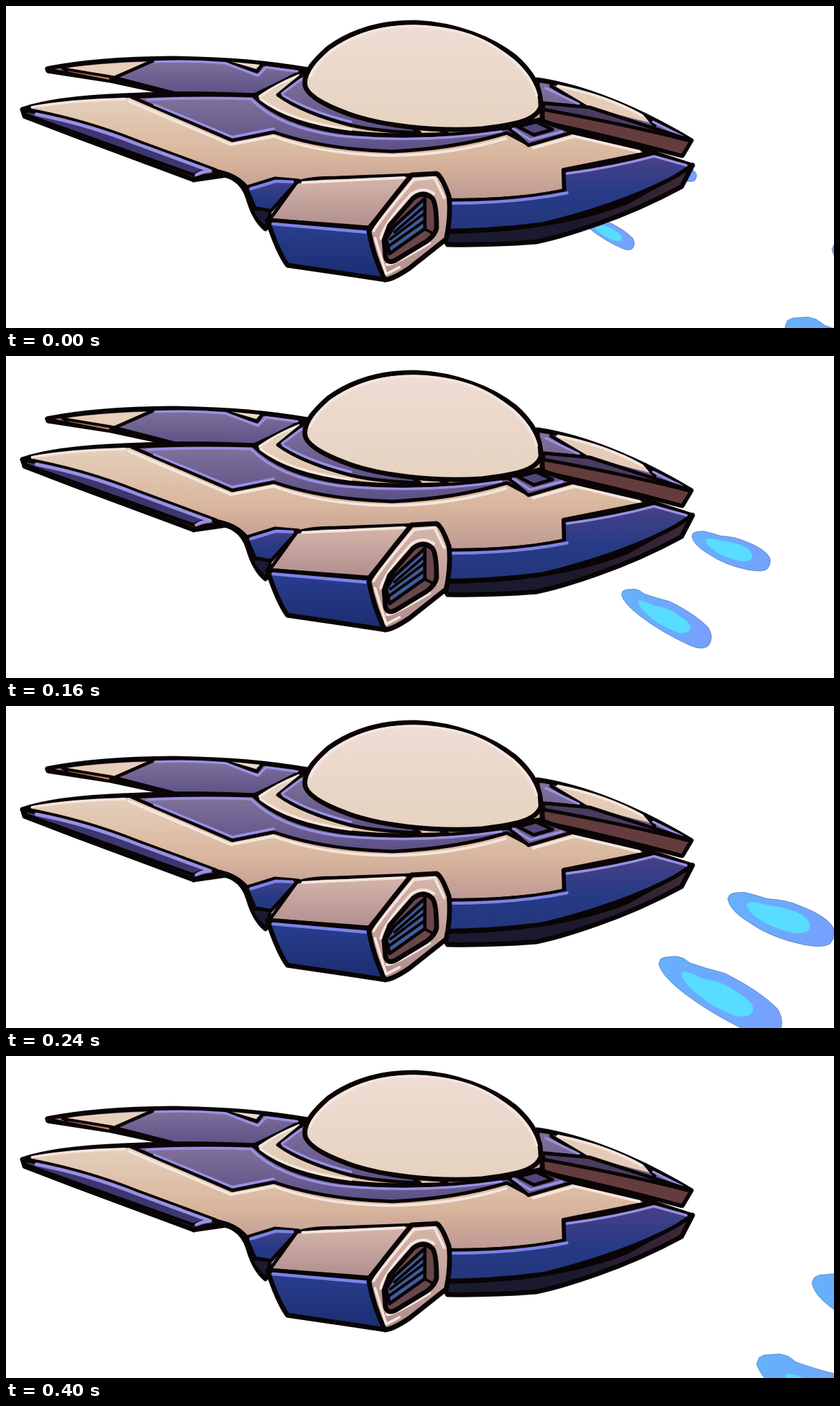
Recreate the animation shown at these times as an HTML page. Size 1200 by 467 pixels, loop 480 ms.

```html
<!DOCTYPE html>
<html lang="en">
<head>
<meta charset="utf-8">
<title>Spaceship</title>
<style>
  html, body { margin: 0; width: 100%; height: 100%; overflow: hidden; background: #fff; }
  svg { display: block; width: 100%; height: 100%; }
  .ship path { stroke: #090405; stroke-width: 7; stroke-linejoin: round; stroke-linecap: round; }
  .ship .edge { fill: none; }
  .ship .thin { stroke-width: 5; }
  .ship .lavender { fill: none; stroke: #9990e4; stroke-width: 3.5; }
  .ship .blue { fill: none; stroke: #7d83e6; stroke-width: 4.5; }
  .ship .light { fill: none; stroke: #f5e5de; stroke-width: 4; }
  .ship .plain { stroke: none; }
  .glow { stroke: #496fae; stroke-width: .7; vector-effect: non-scaling-stroke; }
</style>
</head>
<body>
<svg viewBox="0 0 1200 467">
  <defs>
    <linearGradient id="cream" gradientUnits="userSpaceOnUse" x1="0" y1="130" x2="0" y2="290">
      <stop stop-color="#e5d1bd"/><stop offset=".55" stop-color="#d9b69d"/><stop offset="1" stop-color="#b99492"/>
    </linearGradient>
    <linearGradient id="purple" x2="0" y2="1">
      <stop stop-color="#82739a"/><stop offset="1" stop-color="#5b5087"/>
    </linearGradient>
    <linearGradient id="navy" x2="0" y2="1">
      <stop stop-color="#4a4286"/><stop offset=".55" stop-color="#273a86"/><stop offset="1" stop-color="#22367c"/>
    </linearGradient>
    <linearGradient id="podSide" x2="0" y2="1">
      <stop stop-color="#293f91"/><stop offset="1" stop-color="#1b2c70"/>
    </linearGradient>
    <linearGradient id="podTop" x2="0" y2="1">
      <stop stop-color="#d6b7ab"/><stop offset="1" stop-color="#b08d8d"/>
    </linearGradient>
    <linearGradient id="dome" x2="0" y2="1">
      <stop stop-color="#efddd4"/><stop offset="1" stop-color="#e6d2c0"/>
    </linearGradient>
    <linearGradient id="keel">
      <stop stop-color="#191b31"/><stop offset=".55" stop-color="#1c192d"/><stop offset="1" stop-color="#3f2a3a"/>
    </linearGradient>
    <linearGradient id="plasma">
      <stop stop-color="#65b1fd"/><stop offset="1" stop-color="#77a0ff"/>
    </linearGradient>
    <g id="lowBolt">
      <path class="glow" fill="url(#plasma)" d="M0 8L2 3L6 1L19 0L26 2L33 7Q50 13 70 18Q108 37 126 56Q134 70 127 81Q119 90 100 82Q60 64 28 40Q3 21 0 8Z"/>
      <path fill="#58dcff" d="M24 18Q26 13 47 24Q67 26 83 38Q101 49 100 57Q97 66 81 63Q53 53 34 34Q25 25 24 18Z"/>
    </g>
    <g id="highBolt">
      <path class="glow" fill="url(#plasma)" d="M0 7L2 3L6 1L17 0L29 3L42 7Q63 8 78 15Q107 26 113 39Q115 48 109 55Q102 60 81 56Q47 49 24 33Q2 20 0 7Z"/>
      <path fill="#58dcff" d="M20 13Q22 8 43 14Q64 16 79 24Q90 32 87 39Q83 46 68 43Q43 37 28 25Q20 18 20 13Z"/>
    </g>
  </defs>

  <g id="bolts"></g>

  <g class="ship">
    <!-- far right wing -->
    <path fill="url(#purple)" d="M770 107Q870 122 993 195L980 217L770 162Z"/>
    <path class="plain" fill="#e4ccb9" d="M788 115Q860 124 930 162L936 170L842 146Z"/>
    <path class="thin edge" d="M790 116L842 147M782 141L842 147M927 158L940 174"/>
    <path class="lavender" d="M782 119L830 142M938 168L980 189"/>
    <path class="light" d="M800 116Q870 130 922 159"/>
    <path fill="#4a3b5f" class="thin" d="M779 141L846 147L993 195L985 199L779 151Z"/>
    <path fill="#643c3d" class="thin" d="M778 150Q900 172 993 196L980 217Q880 190 778 168Z"/>

    <!-- far left wing -->
    <path fill="url(#purple)" d="M60 91Q130 77 240 76Q350 77 436 92L362 130L245 128L152 108L61 94Z"/>
    <path class="plain" fill="#e8cfba" d="M88 90Q135 83 206 81L157 103Z"/>
    <path class="plain" fill="#bd7a5e" d="M70 91L90 90L156 102L150 107Z"/>
    <path class="edge" stroke-width="4" style="stroke-width:4" d="M82 91L155 103M84 90L88 96M152 103L151 109"/>
    <path class="thin edge" d="M214 79L157 104L246 127M318 80L364 95L373 83"/>
    <path class="plain" fill="#eddaca" d="M327 81L368 85L362 91Z"/>
    <path class="lavender" d="M216 81Q270 79 318 83L365 101L377 89L422 95"/>

    <!-- hull -->
    <path fill="url(#cream)" d="M24 150Q70 134 170 130Q270 125 360 130L434 95L776 150L778 167L826 184L940 212L810 238L810 268Q740 284 640 282L500 300L348 263Q333 245 304 240Z"/>
    <path class="light" d="M38 147Q90 137 172 135M178 138L326 201L388 189Q460 216 560 217Q650 215 724 192"/>
    <path class="light" d="M764 206L824 189L918 211"/>

    <!-- left wing underside -->
    <path fill="#54302e" d="M24 150Q110 165 190 197L304 239L314 246L272 252L100 188L27 160Z"/>
    <path fill="#3d366e" class="thin" d="M26 151Q110 165 190 196L304 238Q285 238 272 245L146 200L29 158Z"/>
    <path class="lavender" style="stroke-width:5" d="M44 157Q120 172 190 200L296 239Q283 240 276 245"/>
    <path class="edge" d="M272 252Q298 243 320 246Q343 253 351 279Q360 310 376 323"/>

    <!-- upper panels and rings -->
    <path fill="url(#purple)" class="thin" d="M182 132Q270 127 358 130Q400 172 490 184Q600 196 728 177L756 200L726 184Q650 207 560 211Q460 208 388 183L328 195Z"/>
    <path class="lavender" d="M205 136Q280 132 355 135Q395 176 480 188Q600 200 718 182M215 143L328 190L388 178"/>
    <path fill="url(#cream)" class="thin" d="M361 132Q410 172 500 183Q560 190 640 185L500 120L432 94Z"/>
    <path class="light" d="M368 131Q392 114 424 101M369 135Q412 168 500 179"/>
    <path fill="url(#purple)" class="thin" d="M394 129Q430 155 500 173Q540 182 600 184L500 120L432 98Z"/>
    <path class="lavender" d="M400 127L428 106M402 130Q440 153 500 168"/>
    <path fill="#6a5c8c" class="thin" d="M728 176L772 166L822 183L757 202Z"/>
    <path class="lavender" d="M735 178L760 194L806 182"/>
    <path class="thin" fill="#51467a" d="M742 175L765 187L792 179L768 168Z"/>
    <path fill="#c9a28d" class="thin" d="M748 169L776 148L776 164Z"/>

    <!-- dome -->
    <path fill="url(#dome)" d="M433 112C433 94 448 78 467 61C506 33 550 23 595 24C653 27 704 47 738 74C765 98 776 121 775 146C768 168 730 173 690 178C620 183 540 173 495 156C457 142 433 127 433 112Z"/>
    <path class="light" d="M441 102C452 76 486 50 530 37C590 21 665 31 710 61C744 83 763 105 769 130"/>

    <!-- blue side and keel -->
    <path fill="url(#keel)" d="M630 327Q790 327 900 284L995 231L979 262Q920 294 857 316Q800 336 768 342Q710 347 640 346Z"/>
    <path fill="url(#navy)" style="stroke-width:6" d="M630 282Q740 283 809 268L808 238Q870 232 940 213L995 231L972 246Q900 286 780 316Q710 326 630 326Z"/>
    <path class="blue" d="M646 286Q740 286 813 271"/>
    <path class="lavender" d="M813 243Q880 234 939 218L986 231"/>
    <path fill="#1c1a33" class="thin" d="M356 295L384 292L378 322Q362 312 356 295Z"/>
    <path fill="url(#navy)" class="thin" d="M348 263L390 250L424 253L384 297L361 293Z"/>
    <path class="blue" d="M355 265L391 254L415 255"/>

    <!-- engine pod -->
    <path fill="url(#podTop)" class="thin" d="M382 310L421 256Q440 249 480 249L588 245L525 322Z"/>
    <path class="light" d="M430 256L577 249"/>
    <path fill="url(#podSide)" d="M379 311L526 322L550 397L408 376Q394 357 379 311Z"/>
    <path class="blue" d="M387 316L522 328"/>
    <path fill="url(#podTop)" d="M588 245L624 243Q632 247 642 276Q645 305 638 338L585 380Q560 397 549 397Q533 364 526 327Q530 316 588 245Z"/>
    <path class="light" d="M533 326Q536 318 591 252L621 249L635 278M535 337L551 389L570 379"/>
    <path class="light" d="M543 337Q546 318 587 273Q604 261 620 272M552 375Q558 378 614 344"/>
    <path fill="#68474a" d="M548 340L556 318L590 279Q605 267 618 279Q624 287 624 322Q622 332 610 341L564 369Q553 374 550 364Z"/>
    <path fill="#3f5b99" class="thin" d="M551 338L562 320L607 279L607 323L556 359Z"/>
    <path class="edge" style="stroke-width:4" d="M563 328L606 291M557 338L606 301M555 348L606 312M608 324L619 330"/>
  </g>
</svg>
<script>
  const STEP = 80;
  const STEPS = 6;
  // x, y and scale of a bolt for each step of its flight
  const flights = {
    lowBolt: [[835, 304, .58], [858, 320, .71], [892, 338, 1], [946, 363, 1.37], [1015, 399, 1.72], [1088, 432, 1.75], [1129, 451, 1.75]],
    highBolt: [[935, 221, .58], [947, 234, .71], [994, 254, 1], [1046, 270, 1.36], [1109, 292, 1.7], [1168, 316, 1.75], [1197, 340, 1.75]]
  };
  const bolts = document.getElementById("bolts");

  function drawBolt(id, age) {
    const pose = flights[id][age];
    if (!pose) return "";
    const [x, y, scale] = pose;
    return `<use href="#${id}" transform="translate(${x} ${y}) scale(${scale})"/>`;
  }

  let shown = -1;
  function render(now) {
    const step = Math.floor(now / STEP) % STEPS;
    if (step !== shown) {
      shown = step;
      // the previous shot is still leaving the stage as the next one starts
      bolts.innerHTML = Object.keys(flights)
        .map(id => drawBolt(id, step) + drawBolt(id, step + STEPS))
        .join("");
    }
    requestAnimationFrame(render);
  }
  render(performance.now());
</script>
</body>
</html>
```
